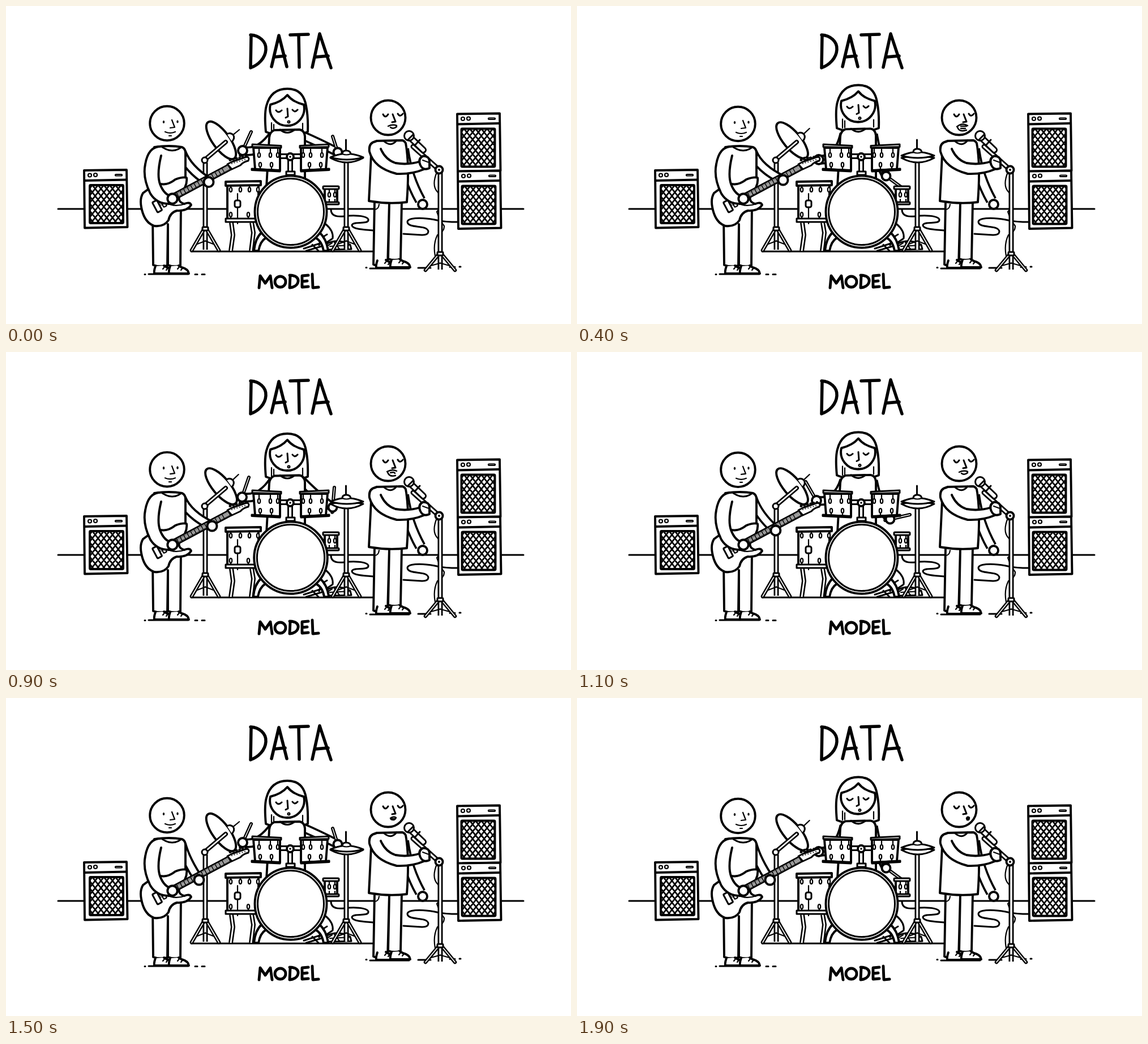
An HTML page for the animation above (2000 ms loop, 998x561 px).

```html
<!DOCTYPE html>
<html lang="en">
<head>
<meta charset="utf-8">
<title>Data model band</title>
<style>
html, body { margin: 0; width: 100%; height: 100%; overflow: hidden; background: #fff; }
svg { display: block; width: 100%; height: 100%; stroke: #000; stroke-width: 3.9; fill: none; stroke-linecap: round; stroke-linejoin: round; }
.w { fill: #fff; }
.k { fill: #000; stroke: none; }
.m { stroke-width: 3; }
.t { stroke-width: 2.2; }
</style>
</head>
<body>
<svg id="stage" viewBox="0 0 998 561"></svg>
<script>
const path = (d, c = '', extra = '') => `<path d="${d}" class="${c}" ${extra}/>`;
const circle = (x, y, r, c = 'w', extra = '') => `<circle cx="${x}" cy="${y}" r="${r}" class="${c}" ${extra}/>`;
const oval = (x, y, rx, ry, c = 'w', extra = '') => `<ellipse cx="${x}" cy="${y}" rx="${rx}" ry="${ry}" class="${c}" ${extra}/>`;
const rect = (x, y, w, h, c = 'w', r = 1.5) => `<rect x="${x}" y="${y}" width="${w}" height="${h}" rx="${r}" class="${c}"/>`;
const group = (body, attrs = '') => `<g ${attrs}>${body}</g>`;
const each = (list, fn) => list.map(fn).join('');

// A limb or rod: a black stroke with a white core.
const tube = (d, w, edge = 3.7, id = '', cap = 'butt') => group(
  path(d, '', `stroke-width="${w}"`) + path(d, '', `stroke="#fff" stroke-width="${w - 2 * edge}"`),
  (id ? `id="${id}" ` : '') + `stroke-linecap="${cap}"`);

function grille(x, y, w, h) {
  let d = '';
  for (let i = -h; i < w + h; i += 10.2) d += `M${x + i} ${y}l${h * .8} ${h}M${x + i} ${y}l${-h * .8} ${h}`;
  const id = `clip${x}-${y}`;
  return `<clipPath id="${id}"><rect x="${x}" y="${y}" width="${w}" height="${h}"/></clipPath>` +
    path(d, '', `stroke-width="2.8" clip-path="url(#${id})"`) + rect(x, y, w, h, '');
}

const amp = (x, y, gx) =>
  path(`M${x + 1} ${y + 1}L${x + 76} ${y}L${x + 77.5} ${y + 101}L${x + 2} ${y + 102.5}Z`, 'w') +
  path(`M${x + 2} ${y + 19}L${x + 76} ${y + 17.5}`) +
  circle(x + 11, y + 9.5, 3, 'w t') + circle(x + 21, y + 9, 3, 'w t') +
  rect(x + 56, y + 8, 12, 2.5, 'w t') +
  grille(x + gx, y + 27, 59, 67);

// Pole with spread feet; h is the height of the foot section.
const tripod = (x, top, y, spread, h) =>
  tube(`M${x} ${top}V${y - 2}`, 9, 2.8) +
  each([-1, 1], k => path(`M${x} ${y - h * .45}L${x + k * spread * .62} ${y - h * .3}`, 't') +
    tube(`M${x + k * 2} ${y - h}L${x + k * spread} ${y - 1}`, 6.6, 2.5, '', 'round')) +
  rect(x - 5, y - h - 3, 10, 6, 'w m');

const lug = (x, y, len) => path(`M${x} ${y}v${len}`, 't') + oval(x, y + len, 2.2, 4, 'w t');

const tom = group(
  path('M437 250L440 288L484 290L484 250Z', 'w') +
  each([447, 467, 480], x => lug(x, 250, 13)) +
  each([449, 469], x => lug(x, 289, -9)) +
  path('M435 244L486 246.5L486 250L435 248.5Z', 'w m') + path('M434 287L484 290L484 292L434 289.5Z', 'w m'));

const shoe = (x, y) => path(`M${x} ${y - 13}Q${x - 3} ${y - 5} ${x - 2} ${y}H${x + 33}Q${x + 32} ${y - 8} ${x + 20} ${y - 11}L${x + 15} ${y - 14}`, 'w') +
  path(`M${x + 13} ${y - 8}l4 -5M${x + 19} ${y - 6}l4 -5`, 't');

const lettering =
  group(path('M433 52L432 109M432 51C447 52 460 62 459 77C458 92 446 104 432 109') +
    path('M469 107L482 52L496 107M474 90L493 88') +
    path('M502 51L534 50M517 51L518 108') +
    path('M541 108L554 49L574 109M547 90L569 88'), 'role="img" aria-label="DATA" stroke-width="5.5"') +
  group(path('M447 497L449 476L458 489L467 476L470 497') +
    oval(484.5, 486.5, 9.5, 9.5, '') +
    path('M502 476L501 497M501 475C512 475 517 480 516 486C515 493 509 496 501 497') +
    path('M534 475L523 476L523 496L534 495M523 486L532 485') +
    path('M541 473L542 497L552 496'), 'role="img" aria-label="MODEL" stroke-width="4.9"');

const floorTom =
  tube('M398 382L401 404L397 432', 8, 2.6) + tube('M434 382L437 400L433 432', 8, 2.6) +
  path('M391 316L391 376H446V316Z', 'w') +
  each([397, 414, 430, 445], x => lug(x, 316, 8)) + each([397, 428], x => lug(x, 376, -8)) +
  path('M409 331V384', 't') + rect(404, 343, 10, 12, 'w m', 3) +
  path('M388 310L450 309L450 316L388 317Z', 'w') + path('M388 375H446V381H388Z', 'w m');

const snare = path('M563 322H585V348H563Z', 'w') +
  each([571, 581], x => lug(x, 324, 9) + path(`M${x} 348v-7`, 't')) +
  rect(560, 318, 28, 5, 'w m') + rect(560, 346, 28, 4, 'w m');

const pedals = path('M565 385Q579 397 577 410L562 420M567 403Q556 408 553 422', 'm') +
  path('M566 420Q585 409 608 421L610 429L566 430Z', 'w m') + path('M572 424L606 422M580 417L590 430M560 428L576 418', 't') +
  path('M526 428L560 417L567 432M530 432L557 424M541 421L552 432', 'm');

const bass = group(
  path('M452 399Q440 410 438 432H446Q449 415 459 409', 'w') +
  path('M553 399Q566 410 569 432H561Q558 415 547 409', 'w') +
  circle(503, 363, 63.5) + circle(503, 363, 58.5, 'w m'), 'id="bass"');

const mount = tube('M483 265H521', 10, 2.9) + tube('M502 270V293', 10, 2.9) +
  circle(502, 266, 6, 'w') + circle(502, 266, 1.8, 'k') + path('M495 292H510V298H495Z', 'w m');

const hihat = path('M600.5 236V256', 'm') + tripod(601, 274, 432, 24, 39) +
  path('M573 268Q602 261 631 268Q602 284 573 268Z', 'w m') +
  group(path('M573 267Q585 262 594 261Q594 255 601 255Q608 255 609 261Q619 262 631 267Q602 275 573 267Z', 'w m') +
    path('M594 261Q601 264 609 261', 't'), 'id="hat"');

const crash = tripod(352, 276, 432, 24, 39) +
  group(oval(0, 0, 39.5, 15, 'w') + path('M-3 -15Q-2 -22 5 -23Q12 -22 13 -14', 'w m') + path('M4.5 -23L3.7 -37', 't'), 'id="crash"') +
  tube('M349 273L388 240', 8, 2.7, '', 'round') + circle(351, 272, 5, 'w m');

const drummer =
  tube('', 17, 3.7, 'armL') + tube('', 17, 3.7, 'armR') +
  group(path('M459 222Q456 190 460 176Q468 146 497 146Q525 146 530 176Q534 195 533 222L521 226H470Z', 'w') +
    path('M469 206V222M473 209V221M524 207V220', 't'), 'id="hair"') +
  group(path('M474 219Q466 222 465 232L460 320H528V230Q527 219 518 218Z', 'w') +
    path('M484 218Q497 229 510 218', 'm'), 'id="shirt"') +
  tube('', 6, 2.3, 'stickL', 'round') + tube('', 6, 2.3, 'stickR', 'round') +
  circle(0, 0, 8, 'w', 'id="handL"') + circle(0, 0, 7.5, 'w', 'id="handR"') +
  group(path('M467 174A30.3 30.3 0 1 0 526 174Q506 169 497 157Q487 169 467 174Z', 'w') +
    path('M477 184Q481 190 487 184M506 183Q510 189 515 183', 'm') +
    path('M497 181L498 195L494 197', 'm') + circle(499.5, 204.5, 1.9, 't') + path('M497 210Q499 211 502 210', 't'), 'id="face"');

function guitar() {
  let frets = '';
  for (let x = 8; x < 112; x += 7) frets += `M${x} -4V4`;
  let pegs = '';
  for (let i = 0; i < 6; i++) pegs += circle(396 + i * 5.6, 271.5 - i * 1.2, 1.4, 'w t') + circle(399 + i * 4.6, 278 - i * 1.4, 1, 'k');
  return path('M319 303Q312 301 299 306Q284 318 270 313Q252 322 242 330Q236 340 239 355Q244 382 262 388Q279 390 287 378Q290 364 302 361Q320 362 327 351Q325 345 315 349Q302 346 307 332Q321 318 319 303Z', 'w') +
    path('M282 346Q296 356 317 349', 't') +
    group(rect(-31, -9, 9, 20, 'w m') + rect(-17, -7, 6, 15, 'w t') + rect(-7, -7, 6, 15, 'w t') +
      rect(0, -5, 119, 10, 'w m', 0) + path(frets, '', 'stroke-width="1.4"') +
      path('M-22 -2H119M-22 .3H119M-22 2.6H119', '', 'stroke-width="1"'), 'transform="translate(290 340) rotate(-28)"') +
    path('M391 279L399 275L425 266Q431 267 428 273Q419 275 414 281L399 288Z', 'w m') + pegs;
}

const guitarist =
  tube('', 18, 3.7, 'fretArm') +
  path('M259 370L260 457Q272 461 285 458L286 385L286 457Q297 461 308 458L309 350Z', 'w') +
  shoe(264, 472) + shoe(290, 472) +
  path('M245 473.5h1M252 473H322M334 473.5h4M346 473.5h5', 'm') +
  path('M262 249Q289 245 311 249Q317 252 317 259V330L262 360Z', 'w') + path('M276 249Q294 261 310 249', 'm') +
  guitar() +
  path('M270 248Q251 250 246 279Q241 303 255 331Q266 349 288 349L293 336Q279 333 272 314Q266 297 274 264', 'w') +
  circle(294, 340, 8.7) + circle(0, 0, 8.5, 'w', 'id="fretHand"') +
  group(circle(284.5, 207, 30.3) + oval(278.5, 204.5, 1.7, 2.6, 'k') + oval(303, 204, 1.7, 2.6, 'k') +
    path('M293 201L298 214L290 215M281 222Q290 226 299 222M288 229h4', 't'), 'id="bob"');

const mouths = [
  'M675 212Q683 208 690 211M679 214Q684 218 690 213',
  'M673 211Q683 206 690 210M674 212Q677 221 688 218M679 213Q686 211 687 214',
  'M671 213Q680 205 690 211M672 213Q674 223 688 219M678 212H688M678 216H686',
  'M679 212Q684 208 689 211Q687 217 680 214ZM682 213H687',
  'M688 212Q690 208 693 211Q693 216 689 215ZM690 212L691 213'
];

const singer =
  tube('M702 252Q708 300 732 343', 20) + circle(736, 350, 8) +
  path('M651 345L649 456Q662 462 674 459L677 347L675 446Q687 450 697 446L699 345Z', 'w') +
  path('M651 359Q658 359 659 350', 't') + shoe(656, 462) + shoe(681, 461) +
  path('M636 461.5h1M643 463H712M728 462h22M784 460.5h9M801 460h2', 'm') +
  path('M654 238Q645 241 645 262L641 344Q675 350 708 346Q713 280 706 242Q703 237 699 237Z', 'w') +
  path('M667 238Q680 250 690 237', 'm') +
  circle(675, 197, 30.5) +
  path('M666 191Q670 199 675 191M692 190Q696 197 701 190', 'm') + path('M683 191L688 204L682 205', 'm') +
  path('', '', 'id="mouth" stroke-width="2.5"');

const mic =
  path('M761 293Q751 318 763 329Q777 346 761 363Q766 378 774 388Q775 397 762 404Q754 420 758 441', 't') +
  tripod(767, 290, 467, 26, 30) +
  tube('M719 248L764 288', 9, 2.9, '', 'round') +
  tube('M714 232L737 254', 12, 3, '', 'round') + circle(712, 229, 8.5, 'w m') +
  path('M710 236L719 227M722 246L731 236', 'm') + circle(765, 289, 6.5) + circle(765, 289, 2, 'k');

const singerArm =
  path('M653 239Q640 241 642 257Q650 286 690 296Q718 297 738 288L732 274Q710 281 688 277Q670 271 662 252', 'w') +
  path('M748 286Q737 291 732 281Q727 270 736 265Q748 264 748 275Z', 'w') + path('M736 272L747 276', 't');

const stage = document.getElementById('stage');
stage.innerHTML = lettering +
  path('M92 358H914', '', 'stroke-width="3"') +
  path('M574 359C574 374 592 372 606 370C626 369 641 372 640 378C639 386 611 379 611 387C612 394 634 395 651 396', 'm') +
  path('M798 381Q772 381 757 377C730 372 709 374 709 381C710 390 728 388 738 391C749 394 749 404 735 404L702 402', 'm') +
  amp(137, 289, 11) + amp(796, 189.5, 8.5) + amp(797, 290.5, 8.5) +
  path('M327 433H650', '', 'stroke-width="3"') +
  crash + drummer + snare + pedals + floorTom + bass + mount +
  tom + group(tom, 'transform="translate(1005 0) scale(-1 1)"') +
  hihat + guitarist + singer + mic + singerArm;

const el = Object.fromEntries([...stage.querySelectorAll('[id]')].map(e => [e.id, e]));
const shift = (e, x, y) => e.setAttribute('transform', `translate(${x} ${y})`);
const bend = (e, d) => { for (const p of e.children) p.setAttribute('d', d); };

// One drum stroke: body lift, crash angle, hat gap, then hand, tip and elbow for each arm.
const poses = [
  [0, 54, 0, [418, 255], [433, 222], [447, 262], [586, 258], [577, 230], [553, 241]],
  [-2, 50, 3, [417, 256], [429, 221], [449, 262], [577, 274], [580, 239], [551, 256]],
  [-2.5, 50, 3, [417, 257], [427, 220], [450, 263], [573, 282], [583, 247], [551, 264]],
  [-4.5, 50, 3, [423, 262], [404, 229], [459, 268], [553, 295], [588, 287], [533, 276]],
  [-6.5, 50, 3, [427, 271], [402, 269], [461, 274], [546, 300], [572, 319], [532, 276]],
  [-2.3, 62, 2, [417, 254], [433, 222], [447, 262], [586, 258], [579, 230], [553, 241]],
  [-1, 58, 1, [418, 255], [433, 222], [447, 262], [586, 258], [578, 230], [553, 241]]
];
const beats = '01234456012345601234';
const lips = '01112222110003333444';

// Position of the fretting hand along the neck, 0 low to 1 high.
const slide = i => i === 0 ? .74 : i < 10 ? 1 : Math.max(0, [.8, .43, .14][i - 10] || 0);

function arm(side, shoulder, hand, tip, elbow) {
  bend(el['arm' + side], `M${shoulder}Q${elbow} ${hand}`);
  const tail = hand.map((v, k) => v + (v - tip[k]) * .25);
  bend(el['stick' + side], `M${tail}L${tip}`);
  shift(el['hand' + side], ...hand);
}

function draw(ms) {
  const i = Math.floor(ms % 2000 / 100);
  const beat = +beats[i];
  const [lift, tilt, gap, handL, tipL, elbowL, handR, tipR, elbowR] = poses[beat];

  shift(el.face, 0, lift);
  shift(el.hair, 0, lift);
  shift(el.shirt, 0, lift * .25);
  arm('L', [472, 227 + lift * .25], handL, tipL, elbowL);
  arm('R', [523, 228 + lift * .25], handR, tipR, elbowR);

  el.crash.setAttribute('transform', `translate(380 237) rotate(${tilt})`);
  shift(el.hat, 0, -gap);
  const kick = beat === 1 ? 1.02 : 1;
  el.bass.setAttribute('transform', `translate(503 363) scale(${kick} 1) translate(-503 -363)`);

  const s = slide(i);
  const hx = 341 + 23 * s, hy = 321 - 14 * s;
  shift(el.fretHand, hx, hy);
  bend(el.fretArm, `M310 258Q${318 + 4 * s} 287 ${hx} ${hy}`);
  shift(el.bob, 0, .5 - .5 * Math.cos(lift / 6.5 * Math.PI));
  el.mouth.setAttribute('d', mouths[lips[i]]);
}

const start = performance.now();
function tick() {
  draw(performance.now() - start);
  requestAnimationFrame(tick);
}
tick();
</script>
</body>
</html>
```
